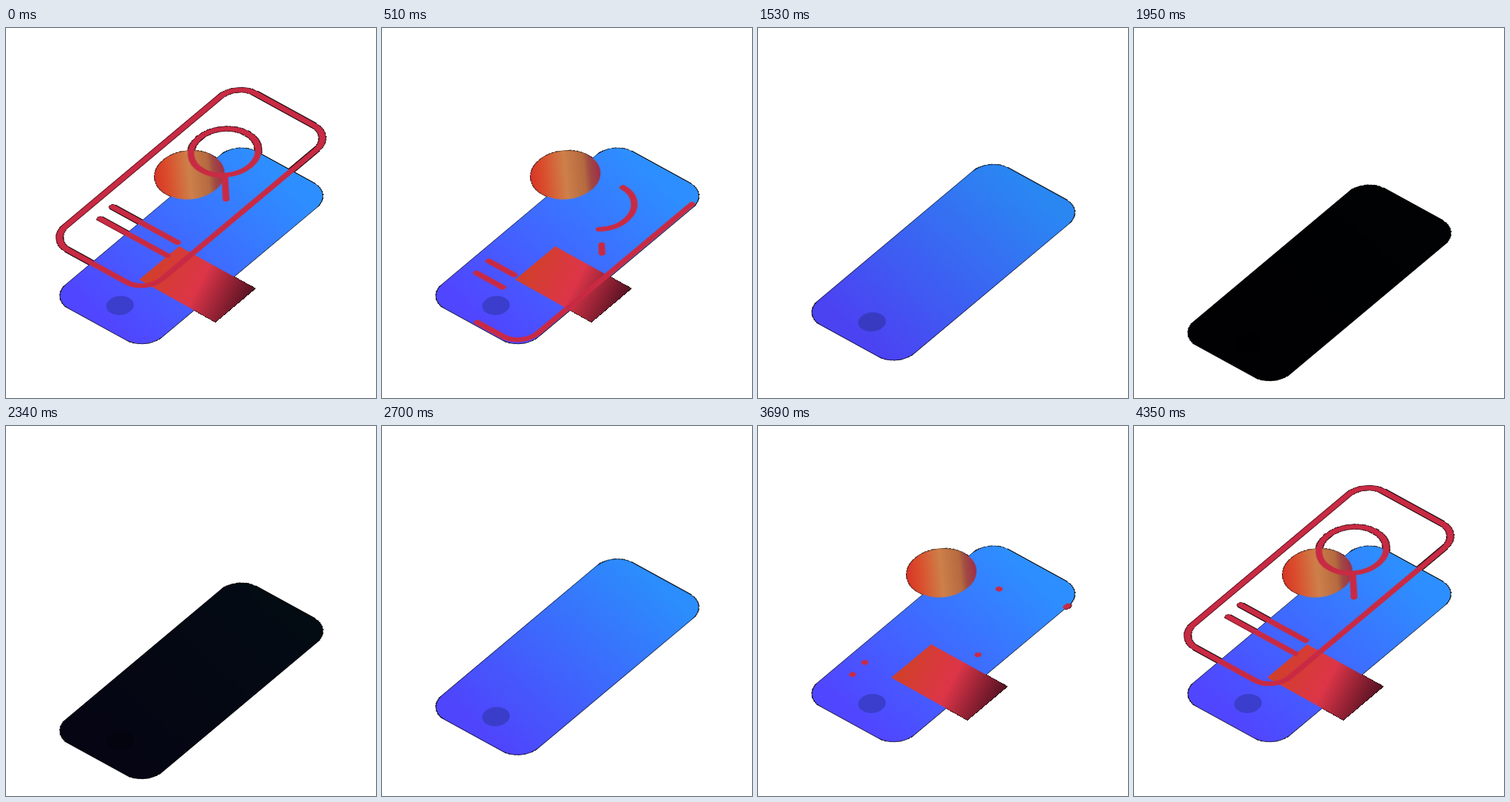
An HTML page without scripts for the animation above (4.53 s loop, 500 by 500 pixels).

```html
<!DOCTYPE html>
<html lang="en">
<head>
<meta charset="utf-8">
<title>Layered phone</title>
<style>
html, body { margin: 0; width: 100%; height: 100%; overflow: hidden; background: #fff; }
svg { display: block; width: 100vw; height: 100vh; }

.wire-move, .wire-draw, .part-move, .part-fade, .part-show,
.body-move, .body-fade, .body-show {
  animation: 4.53s cubic-bezier(.8, 0, .2, 1) infinite;
}
.wire-move { animation-name: wire-move; }
.wire-draw { animation-name: wire-draw, wire-show; fill: none; stroke-linecap: round; }
.part-move { animation-name: part-move; }
.part-fade { animation-name: part-fade; }
.part-show { animation-name: part-show; }
.body-move { animation-name: body-move; }
.body-fade { animation-name: body-fade; }
.body-show { animation-name: body-show; }

@keyframes wire-move {
  0%, 96.03%, 100% { transform: none; }
  15.67%, 80.35% { transform: translateY(78px); }
}
@keyframes wire-draw {
  0%, 3.09%, 96.03%, 100% { stroke-dasharray: 100 200; }
  18.76%, 80.35% { stroke-dasharray: 0 200; }
}
@keyframes wire-show {
  0%, 100% { visibility: visible; }
  18.76%, 80.35% { visibility: hidden; }
}
@keyframes part-move {
  0%, 13.31%, 79.76%, 100% { transform: none; }
  28.98%, 64.08% { transform: translateY(-23px); }
}
@keyframes part-fade {
  0%, 16.56%, 76.51%, 100% { opacity: 1; }
  32.23%, 60.84% { opacity: 0; }
}
@keyframes part-show {
  0%, 100% { visibility: visible; }
  32.23%, 60.84% { visibility: hidden; }
}
@keyframes body-move {
  0%, 26.14%, 66.95%, 100% { transform: none; }
  41.81%, 51.28% { transform: translateY(50px); }
}
@keyframes body-fade {
  0%, 29.8%, 61.2%, 100% { opacity: 1; }
  45.47%, 47.62% { opacity: 0; }
}
@keyframes body-show {
  0%, 100% { visibility: visible; }
  45.47%, 47.62% { visibility: hidden; }
}
</style>
</head>
<body>
<svg viewBox="0 0 500 500">
  <defs>
    <linearGradient id="blue" gradientUnits="userSpaceOnUse" x1="20" y1="40" x2="310" y2="107">
      <stop offset="0" stop-color="#5046ff"/>
      <stop offset="1" stop-color="#2d8fff"/>
    </linearGradient>
    <linearGradient id="amber">
      <stop offset="0" stop-color="#d93426"/>
      <stop offset=".22" stop-color="#d9522e"/>
      <stop offset=".5" stop-color="#cd804a"/>
      <stop offset=".77" stop-color="#b5693f"/>
      <stop offset=".85" stop-color="#a04a44"/>
      <stop offset="1" stop-color="#a02c48"/>
    </linearGradient>
    <linearGradient id="crimson" gradientUnits="userSpaceOnUse" x1="195" y1="312" x2="327" y2="381">
      <stop offset="0" stop-color="#d04028"/>
      <stop offset=".5" stop-color="#dd3548"/>
      <stop offset="1" stop-color="#4a0f20"/>
    </linearGradient>

    <rect id="body" x="-.3" y="-.5" width="330.2" height="147.8" rx="29.5" transform="matrix(.7665 -.642 .877 .481 59.85 364.9)"/>
    <ellipse id="disc" rx="47.4" ry="33" transform="translate(248 198.5) rotate(-5.5)"/>
    <path id="card" d="M180 340L234 295L337 352L283 397.5Z"/>
    <g id="wire" transform="matrix(.7665 -.642 .877 .481 59.85 286.9)">
      <path pathLength="100" d="M300 147H29A29 29 0 0 1 0 118V27.5A29 29 0 0 1 29 -1.5H301A29 29 0 0 1 330 27.5V118A29.5 29.5 0 0 1 300 147Z"/>
      <circle pathLength="100" cx="234" cy="64.1" r="39.2"/>
      <path pathLength="100" d="M174.8 118L202 92.5"/>
      <path pathLength="100" d="M86 21V121"/>
      <path pathLength="100" d="M62.2 23V126"/>
    </g>
  </defs>

  <!-- black backing behind the fading layers -->
  <g stroke="#000" shape-rendering="crispEdges">
    <g class="body-move"><use href="#body" class="body-show" stroke-width="1.8"/></g>
    <g class="part-move">
      <g class="part-show"><use href="#disc"/><use href="#card"/></g>
    </g>
    <g class="wire-move"><use href="#wire" class="wire-draw" stroke-width="9.2"/></g>
  </g>

  <g class="body-move">
    <g class="body-fade">
      <use href="#body" fill="url(#blue)"/>
      <ellipse rx="18.7" ry="12.8" transform="translate(154 375) rotate(-5.5)" fill="#3b3ecc"/>
    </g>
  </g>
  <g class="part-move">
    <g class="part-fade">
      <use href="#disc" fill="url(#amber)"/>
      <use href="#card" fill="url(#crimson)"/>
    </g>
  </g>
  <g class="wire-move"><use href="#wire" class="wire-draw" stroke="#c92a43" stroke-width="7.8"/></g>
</svg>
</body>
</html>
```
